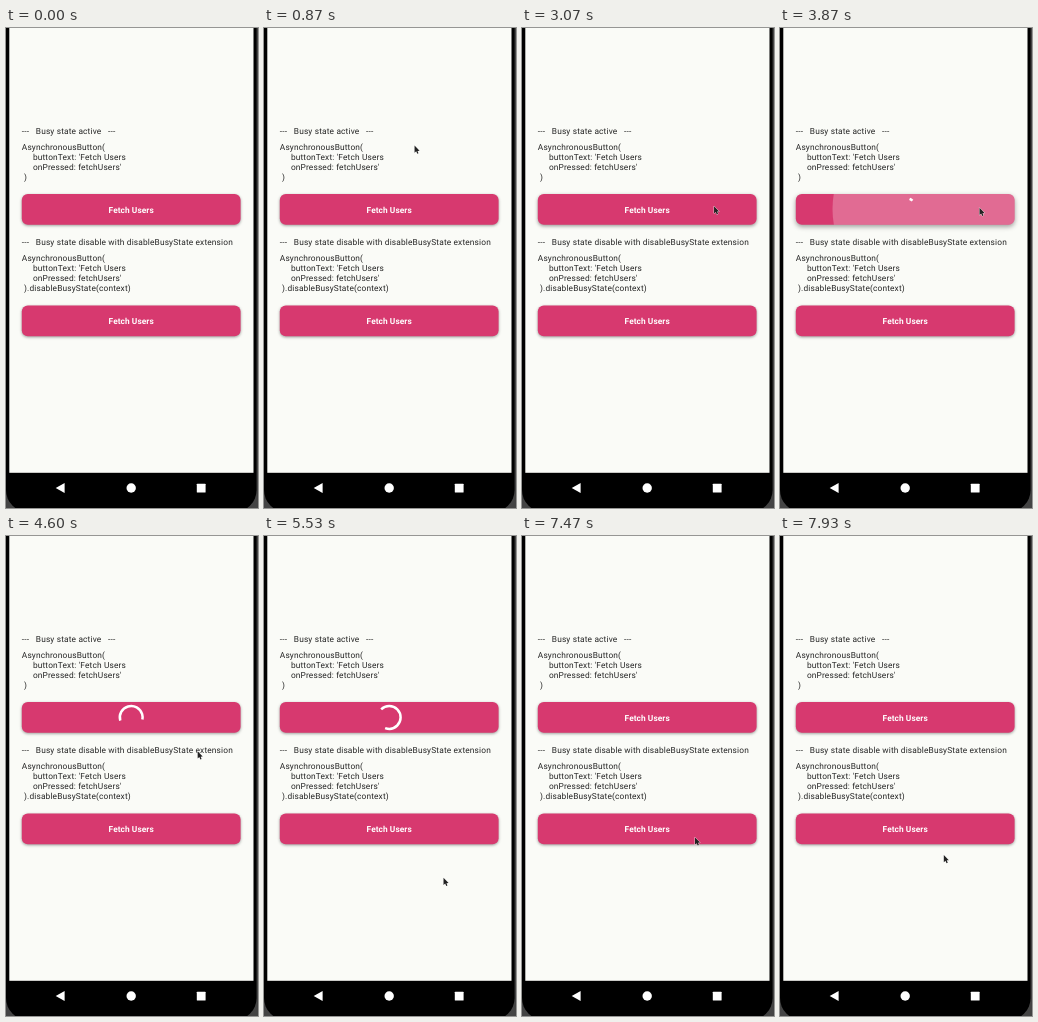
These frames come from a looping animation (252x480 px, 8 s). An HTML page with a canvas:

```html
<!DOCTYPE html>
<html lang="en">
<head>
<meta charset="utf-8">
<title>Asynchronous button</title>
<style>
  html, body { margin: 0; width: 100%; height: 100%; overflow: hidden; background: #000; }
  canvas { display: block; width: 252px; height: 480px; }
</style>
</head>
<body>
<canvas id="stage"></canvas>
<script>
const LOOP = 8000, FPS = 15;
const PINK = '#d7396f', PAPER = '#fafbf7', INK = '#252525', RIM = '#444';
const FONT = '8.35px Roboto, sans-serif';
const BUTTON = { x: 15.8, w: 218.8, h: 30.8, r: 6 };
const TOPS = [166, 277.5];
const BUSY = { start: 3768, end: 6790 };

// x, y: where the pointer went down; a cancelled press fades at once.
const PRESSES = [
  { button: 0, x: 186, y: 177, down: 2190, up: 2900, cancelled: true },
  { button: 0, x: 199.5, y: 180, down: 3715, up: 3785 },
  { button: 1, x: 178.3, y: 292, down: 6980, up: 7070 }
];

// time, x, y
const POINTER = [
  [600, 130, 43], [870, 150.8, 118.5], [1250, 180, 166], [1400, 190, 169],
  [1730, 185.3, 176.8], [2700, 185.3, 176.8], [3000, 191, 178], [3530, 199.5, 179.8],
  [4200, 199.5, 179.8], [4530, 193, 197], [5000, 184, 320], [5300, 180, 349],
  [5400, 180, 349], [5530, 179.5, 342], [6270, 181, 304], [6650, 178.3, 291.3],
  [7200, 178.3, 291.3], [7930, 163.8, 319]
];

const canvas = document.getElementById('stage');
const ctx = canvas.getContext('2d');
const dpr = window.devicePixelRatio || 1;
canvas.width = 252 * dpr;
canvas.height = 480 * dpr;
ctx.textRendering = 'geometricPrecision';

const clamp = v => Math.min(1, Math.max(0, v));
const lerp = (a, b, k) => a + (b - a) * k;

function bezier(x1, y1, x2, y2) {
  const at = (a, b, s) => 3 * a * s * (1 - s) ** 2 + 3 * b * s * s * (1 - s) + s ** 3;
  return x => {
    let lo = 0, hi = 1;
    for (let i = 0; i < 20; i++) {
      const mid = (lo + hi) / 2;
      if (at(x1, x2, mid) < x) lo = mid; else hi = mid;
    }
    return at(y1, y2, (lo + hi) / 2);
  };
}
const ease = bezier(0.25, 0.1, 0.25, 1);
const fastOutSlowIn = bezier(0.4, 0, 0.2, 1);

function text(str, x, y, spacing = 0.149) {
  ctx.letterSpacing = spacing + 'px';
  ctx.fillText(str, x, y);
}

function drawSample(title, closing, y) {
  ctx.fillStyle = INK;
  ctx.font = FONT;
  ctx.textAlign = 'left';
  text(title, 15.8, y);
  const lines = ['AsynchronousButton(', "     buttonText: 'Fetch Users", "     onPressed: fetchUsers'", closing];
  lines.forEach((line, i) => text(line, 15.8, y + 16.2 + i * 9.9));
}

function lift(index, t) {
  return PRESSES.reduce((most, p) => {
    if (p.button !== index) return most;
    const rise = clamp((t - p.down) / 200);
    const fall = clamp((t - p.up) / 200);
    return Math.max(most, rise * (1 - fall));
  }, 0);
}

function drawRipple(p, t) {
  if (t < p.down) return;
  const held = (Math.min(t, p.up) - p.down) / 1000;
  const released = p.cancelled ? 0 : Math.max(0, t - p.up) / 225;
  const k = ease(clamp(held + released));
  const fade = p.cancelled ? (t - p.up) / 75 : (t - p.up - 225) / 150;
  const alpha = 0.25 * clamp((t - p.down) / 75) * (1 - clamp(fade));
  if (alpha <= 0) return;
  const cx = BUTTON.x + BUTTON.w / 2, cy = TOPS[p.button] + BUTTON.h / 2;
  const reach = Math.hypot(BUTTON.w, BUTTON.h) / 2;
  ctx.fillStyle = `rgba(255,255,255,${alpha})`;
  ctx.beginPath();
  ctx.arc(lerp(p.x, cx, k), lerp(p.y, cy, k), lerp(reach * 0.3, reach + 5, k), 0, 2 * Math.PI);
  ctx.fill();
}

function drawSpinner(x, y, elapsed) {
  const cycle = (elapsed / 1333) % 1;
  const head = fastOutSlowIn(clamp(cycle * 2));
  const tail = fastOutSlowIn(clamp(cycle * 2 - 1));
  const start = Math.PI * (-0.5 + 1.5 * tail + 2 * elapsed / 2222 + 0.5 * cycle);
  ctx.strokeStyle = '#fff';
  ctx.lineWidth = 2.5;
  ctx.beginPath();
  ctx.arc(x, y, 11.4, start, start + Math.max(0.01, 1.5 * Math.PI * (head - tail)));
  ctx.stroke();
}

function drawButton(index, t) {
  const { x, w, h, r } = BUTTON, y = TOPS[index], raised = lift(index, t);
  const cx = x + w / 2;
  ctx.beginPath();
  ctx.roundRect(x, y, w, h, r);
  ctx.save();
  ctx.shadowColor = 'rgba(0,0,0,0.38)';
  ctx.shadowOffsetY = lerp(1, 3, raised) * dpr;
  ctx.shadowBlur = lerp(3, 7, raised) * dpr;
  ctx.fillStyle = PINK;
  ctx.fill();
  ctx.restore();

  ctx.save();
  ctx.clip();
  PRESSES.filter(p => p.button === index).forEach(p => drawRipple(p, t));
  ctx.restore();

  if (index === 0 && t >= BUSY.start && t < BUSY.end) {
    drawSpinner(cx, y + h / 2, t - BUSY.start);
    return;
  }
  ctx.fillStyle = '#fff';
  ctx.font = 'bold ' + FONT;
  ctx.textAlign = 'center';
  text('Fetch Users', cx, y + 18.5, 0.06);
}

function drawPhone() {
  ctx.fillStyle = RIM;
  ctx.fillRect(0, 0, 252, 480);
  ctx.fillStyle = '#000';
  ctx.beginPath();
  ctx.roundRect(0, -30, 250.6, 514, 22);
  ctx.fill();
  ctx.fillStyle = PAPER;
  ctx.fillRect(3.3, 0, 244.2, 444.8);
  ctx.fillStyle = '#fff';
  ctx.beginPath();
  ctx.moveTo(49.7, 460);
  ctx.lineTo(58.6, 455);
  ctx.lineTo(58.6, 465);
  ctx.fill();
  ctx.beginPath();
  ctx.arc(125.2, 460, 4.7, 0, 2 * Math.PI);
  ctx.fill();
  ctx.beginPath();
  ctx.roundRect(190.8, 455.7, 8.8, 8.8, 0.6);
  ctx.fill();
}

function pointerAt(t) {
  const next = POINTER.findIndex(p => p[0] > t);
  if (next === 0) return null;
  if (next < 0) return POINTER[POINTER.length - 1].slice(1);
  const [t0, x0, y0] = POINTER[next - 1], [t1, x1, y1] = POINTER[next];
  const k = (t - t0) / (t1 - t0);
  return [lerp(x0, x1, k), lerp(y0, y1, k)];
}

function drawPointer(t) {
  const pos = pointerAt(t);
  if (!pos) return;
  ctx.save();
  ctx.translate(...pos);
  ctx.scale(0.92, 0.92);
  ctx.beginPath();
  [[0, 0], [0, 7.8], [1.8, 6.3], [3, 8.9], [4.3, 8.3], [3.2, 5.8], [5.5, 5.6]]
    .forEach(p => ctx.lineTo(...p));
  ctx.closePath();
  ctx.strokeStyle = 'rgba(255,255,255,0.75)';
  ctx.lineWidth = 1;
  ctx.stroke();
  ctx.fillStyle = '#222';
  ctx.fill();
  ctx.restore();
}

function draw(now) {
  // The small bias keeps times rounded to 10 ms on their own step.
  const t = Math.floor((now % LOOP) * FPS / 1000 + 0.1) * 1000 / FPS;
  ctx.setTransform(dpr, 0, 0, dpr, 0, 0);
  drawPhone();
  drawSample('---   Busy state active   ---', ' )', 105.8);
  drawSample('---   Busy state disable with disableBusyState extension', ' ).disableBusyState(context)', 217.2);
  TOPS.forEach((_, i) => drawButton(i, t));
  drawPointer(t);
  requestAnimationFrame(draw);
}
draw(0);
</script>
</body>
</html>
```
